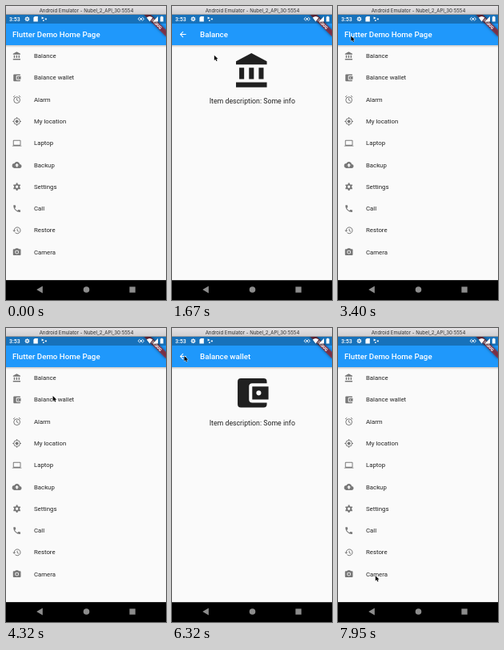
Animation of 200 by 368 pixels, one loop 8000 ms. Source, as an HTML page with a canvas:

```html
<!DOCTYPE html>
<html lang="en">
<head>
<meta charset="utf-8">
<title>List with item details</title>
<style>
  html, body { margin: 0; width: 100%; height: 100%; overflow: hidden; background: #000; }
  canvas { display: block; width: 200px; height: 368px; }
</style>
</head>
<body>
<canvas id="stage"></canvas>
<script>
const W = 200, H = 368, LOOP = 8000;
const DP = 0.487;
const TOP = 10.7, BAR = 22, BODY = 49, BOTTOM = 343.5;
const ROW = 56 * DP, MIDDLE = 100.3;
const FADE = 300;
const BLUE = '#1f98fb', INK = 'rgba(0,0,0,.87)';
const ratio = Math.max(1, window.devicePixelRatio || 1);

function makeCanvas(el) {
  el.width = W * ratio;
  el.height = H * ratio;
  const c = el.getContext('2d');
  c.scale(ratio, ratio);
  return c;
}
const ctx = makeCanvas(document.getElementById('stage'));
const layer = makeCanvas(document.createElement('canvas'));

// Icons live on a 24-unit grid: fill path, then an optional stroke path.
function gear(teeth) {
  const step = Math.PI * 2 / teeth, points = [];
  for (let i = 0; i < teeth; i++) {
    for (const [turn, r] of [[-.3, 7.3], [-.17, 10], [.17, 10], [.3, 7.3]]) {
      const a = (i + turn) * step;
      points.push((12 + r * Math.sin(a)).toFixed(2) + ' ' + (12 - r * Math.cos(a)).toFixed(2));
    }
  }
  return 'M' + points.join('L') + 'z' + disc(12, 12, 3.5);
}
function disc(x, y, r) {
  return `M${x - r} ${y}a${r} ${r} 0 0 0 ${2 * r} 0a${r} ${r} 0 0 0 ${-2 * r} 0z`;
}
function icon(fill, stroke) {
  return { fill: new Path2D(fill), stroke: stroke && new Path2D(stroke) };
}
const GEAR = icon(gear(8));
const BACK = icon('M20 11H7.8l5.6-5.6L12 4l-8 8 8 8 1.4-1.4L7.8 13H20z');
const ITEMS = [
  ['Balance', icon('M4 10h3v7H4zM10 10h3v7h-3zM16 10h3v7h-3zM2 19h19v3H2zM11.5 1L2 6v2h19V6z')],
  ['Balance wallet', icon('M21 18v1a2 2 0 0 1-2 2H5a2 2 0 0 1-2-2V5a2 2 0 0 1 2-2h14a2 2 0 0 1 2 2v1h-9a2 2 0 0 0-2 2v8a2 2 0 0 0 2 2zM12 8h10v8H12z' + disc(16, 12, 1.5))],
  ['Alarm', icon('', disc(12, 13, 8) + 'M12 8v5.5l4 2.4M2.5 5.5l4.6-3.8M21.5 5.5l-4.6-3.8')],
  ['My location', icon(disc(12, 12, 4), disc(12, 12, 8) + 'M12 1v3M12 20v3M1 12h3M20 12h3')],
  ['Laptop', icon('M20 18a2 2 0 0 0 2-2V6a2 2 0 0 0-2-2H4a2 2 0 0 0-2 2v10a2 2 0 0 0 2 2H0v2h24v-2zM4 6h16v10H4z')],
  ['Backup', icon('M19.4 10A7.5 7.5 0 0 0 5.4 8A6 6 0 0 0 6 20h13a5 5 0 0 0 .4-10zM14 13v4h-4v-4H7l5-5 5 5z')],
  ['Settings', icon(gear(6))],
  ['Call', icon('M6.6 10.8c1.4 2.8 3.8 5.1 6.6 6.6l2.2-2.2c.3-.3.7-.4 1-.2 1.1.4 2.3.6 3.6.6.6 0 1 .4 1 1V20c0 .6-.4 1-1 1C10.6 21 3 13.4 3 4c0-.6.4-1 1-1h3.5c.6 0 1 .4 1 1 0 1.3.2 2.5.6 3.6.1.3 0 .7-.2 1z')],
  ['Restore', icon('M1 12h8l-4 4z', 'M5 12a8 8 0 1 1 2.3 5.7M13 8v5l4 2.4')],
  ['Camera', icon('M9 2L7.2 4H4a2 2 0 0 0-2 2v12a2 2 0 0 0 2 2h16a2 2 0 0 0 2-2V6a2 2 0 0 0-2-2h-3.2L15 2z' + disc(12, 12, 5) + disc(12, 12, 3.2))]
];

// Visits to a detail page, and cursor stops as time, x, y.
const VISITS = [
  { item: 0, open: 1230, close: 2720 },
  { item: 1, open: 4690, close: 6420 }
];
const STOPS = [
  [420, 206, 130], [1000, 57.8, 65], [1450, 57.8, 65], [2350, 17.8, 38],
  [2700, 17.8, 38], [3100, 16.3, 37.5], [3550, 16.3, 37.5], [4450, 60.4, 87],
  [5050, 60.4, 87], [5950, 15.4, 35], [6800, 15.4, 35], [7750, 46.8, 310], [8000, 46.8, 310]
];

function bezier(x1, y1, x2, y2) {
  const at = (a, b, s) => 3 * a * s * (1 - s) ** 2 + 3 * b * s * s * (1 - s) + s ** 3;
  return x => {
    if (x <= 0) return 0;
    if (x >= 1) return 1;
    let lo = 0, hi = 1;
    for (let i = 0; i < 20; i++) {
      const mid = (lo + hi) / 2;
      if (at(x1, x2, mid) < x) lo = mid; else hi = mid;
    }
    return at(y1, y2, lo);
  };
}
const fastOutSlowIn = bezier(.4, 0, .2, 1);
const easeIn = bezier(.42, 0, 1, 1);
const easeInOut = bezier(.42, 0, .58, 1);
const mix = (a, b, k) => a + (b - a) * k;
const clamp = v => Math.min(1, Math.max(0, v));

function drawIcon(c, shape, x, y, size, color) {
  c.save();
  c.translate(x, y);
  c.scale(size / 24, size / 24);
  c.fillStyle = c.strokeStyle = color;
  c.lineWidth = 2;
  c.fill(shape.fill, 'evenodd');
  if (shape.stroke) c.stroke(shape.stroke);
  c.restore();
}
function text(c, str, x, y, size, color, weight = 400, align = 'left', family = 'Roboto') {
  c.font = `${weight} ${size}px ${family}, sans-serif`;
  c.fillStyle = color;
  c.textAlign = align;
  c.textBaseline = 'alphabetic';
  c.fillText(str, x, y + size * .355);
}
function box(c, x, y, w, h, color) {
  c.fillStyle = color;
  c.fillRect(x, y, w, h);
}
function shape(c, path, color) {
  c.fillStyle = color;
  c.fill(new Path2D(path));
}

function page(c, title, titleX) {
  box(c, 0, TOP, W, BOTTOM - TOP, '#fafafa');
  const shade = c.createLinearGradient(0, BODY, 0, BODY + 3);
  shade.addColorStop(0, 'rgba(0,0,0,.2)');
  shade.addColorStop(1, 'rgba(0,0,0,0)');
  box(c, 0, BODY, W, 3, shade);
  box(c, 0, TOP, W, BODY - TOP, BLUE);
  text(c, title, titleX, 35.7, 20 * DP, '#fff', 500);
}
const rowY = i => BODY + ROW * (i + .5);

function home(c, hidden) {
  page(c, 'Flutter Demo Home Page', 8);
  ITEMS.forEach(([name, pic], i) => {
    const y = rowY(i), size = 24 * DP;
    if (i !== hidden) drawIcon(c, pic, 16 * DP, y - size / 2, size, 'rgba(0,0,0,.52)');
    text(c, name, 35, y - .2, 16 * DP, INK);
  });
}
const BIG = { x: MIDDLE - 50 * DP, y: 57, size: 100 * DP };

function detail(c, item, flying) {
  const [name, pic] = ITEMS[item];
  page(c, name, 35);
  drawIcon(c, BACK, 16 * DP, 35.6 - 12 * DP, 24 * DP, '#fff');
  if (!flying) drawIcon(c, pic, BIG.x, BIG.y, BIG.size, INK);
  text(c, 'Item description: Some info', MIDDLE, 118.5, 18 * DP, INK, 400, 'center');
}

// The shared icon travels on an arc between its row and the detail page.
function flight(visit, k, closing) {
  const pic = ITEMS[visit.item][1], small = 24 * DP;
  const bend = .5 * k * (1 - k);
  const x = mix(16 * DP, BIG.x, k + bend);
  const y = mix(rowY(visit.item) - small / 2, BIG.y, k - bend);
  const inset = closing ? (mix(small, BIG.size, k) - small) / 2 : 0;
  drawIcon(ctx, pic, x + inset, y + inset, closing ? small : BIG.size, INK);
}

function screen(t) {
  const visit = VISITS.find(v => t >= v.open && t < v.close + FADE);
  ctx.save();
  ctx.beginPath();
  ctx.rect(0, TOP, W, BOTTOM - TOP);
  ctx.clip();
  if (!visit) {
    home(ctx, -1);
  } else {
    const closing = t >= visit.close;
    const done = clamp((t - (closing ? visit.close : visit.open)) / FADE);
    const shown = closing ? 1 - done : done;
    const flying = closing || done < 1;
    home(ctx, visit.item);
    layer.clearRect(0, 0, W, H);
    detail(layer, visit.item, flying);
    ctx.globalAlpha = easeIn(shown);
    ctx.drawImage(layer.canvas, 0, (1 - fastOutSlowIn(shown)) * (BOTTOM - TOP) / 4, W, H);
    ctx.globalAlpha = 1;
    const k = fastOutSlowIn(done);
    if (flying) flight(visit, closing ? 1 - k : k, closing);
  }
  ribbon();
  ctx.restore();
}

function ribbon() {
  ctx.save();
  ctx.translate(W, TOP);
  ctx.rotate(Math.PI / 4);
  ctx.shadowColor = 'rgba(0,0,0,.8)';
  ctx.shadowBlur = 3.8 * ratio;
  box(ctx, -40 * DP, 28 * DP, 80 * DP, 12 * DP, 'rgba(183,28,28,.63)');
  ctx.shadowColor = 'transparent';
  text(ctx, 'DEBUG', 0, 34 * DP, 5, '#fff', 900, 'center');
  ctx.restore();
}

function statusBar() {
  box(ctx, 0, TOP, W, BAR - TOP, 'rgba(0,0,0,.26)');
  text(ctx, '3:53', 4, 16.3, 7, '#fff', 500);
  drawIcon(ctx, GEAR, 22.8, 12.6, 7.4, '#fff');
  shape(ctx, 'M36 13h3.8v6.4h-5.4v-4.8z', '#fff');
  shape(ctx, 'M44.6 13.5l3 1.4-3 1.6zM46 17.5h1.6v1.6H46zM48.8 15.6h2v1.6h-2z', '#fff');
  shape(ctx, disc(168.8, 16.2, 1.2), '#fff');
  ctx.strokeStyle = '#fff';
  ctx.lineWidth = .9;
  ctx.stroke(new Path2D('M167.4 13.8l-2.2 2.4 2.2 2.4M170.2 13.8l2.2 2.4-2.2 2.4'));
  shape(ctx, 'M175.8 14.4Q179.6 11.4 183.4 14.4L179.6 19.4z', '#fff');
  shape(ctx, 'M190 13v6.4h-6.4z', '#fff');
  shape(ctx, 'M192.8 13.6h1v-.8h1.8v.8h1v6h-3.8z', '#fff');
}

function windowFrame() {
  const shade = ctx.createLinearGradient(0, 0, 0, TOP);
  shade.addColorStop(0, '#e4e2e4');
  shade.addColorStop(1, '#d0ced0');
  box(ctx, 0, 0, W, TOP, shade);
  text(ctx, 'Android Emulator - Nubel_2_API_30:5554', 100.5, 5.5, 6.05, '#2e2e2e', 400, 'center', 'Inter');
  box(ctx, 0, BOTTOM, W, H - BOTTOM, '#000');
  shape(ctx, 'M38.2 355l7.6-4.4v8.8z', '#8c8c8c');
  shape(ctx, disc(100.5, 355, 3.8), '#8c8c8c');
  box(ctx, 154.4, 351.4, 7.3, 7.3, '#8c8c8c');
}

function cursor(t) {
  const next = STOPS.findIndex(s => s[0] > t);
  if (next < 1) return;
  const [t0, x0, y0] = STOPS[next - 1], [t1, x1, y1] = STOPS[next];
  const k = easeInOut((t - t0) / (t1 - t0));
  const arrow = new Path2D('M0 0v7.6l1.8-1.6 1.3 2.8 1.3-.6-1.3-2.7h2.4z');
  ctx.save();
  ctx.translate(mix(x0, x1, k), mix(y0, y1, k));
  ctx.scale(.85, .85);
  ctx.strokeStyle = '#fff';
  ctx.lineWidth = 1;
  ctx.stroke(arrow);
  ctx.fillStyle = '#000';
  ctx.fill(arrow);
  ctx.restore();
}

const start = performance.now();
function draw() {
  const t = (performance.now() - start) % LOOP;
  ctx.clearRect(0, 0, W, H);
  screen(t);
  statusBar();
  windowFrame();
  cursor(t);
  requestAnimationFrame(draw);
}
draw();
</script>
</body>
</html>
```
